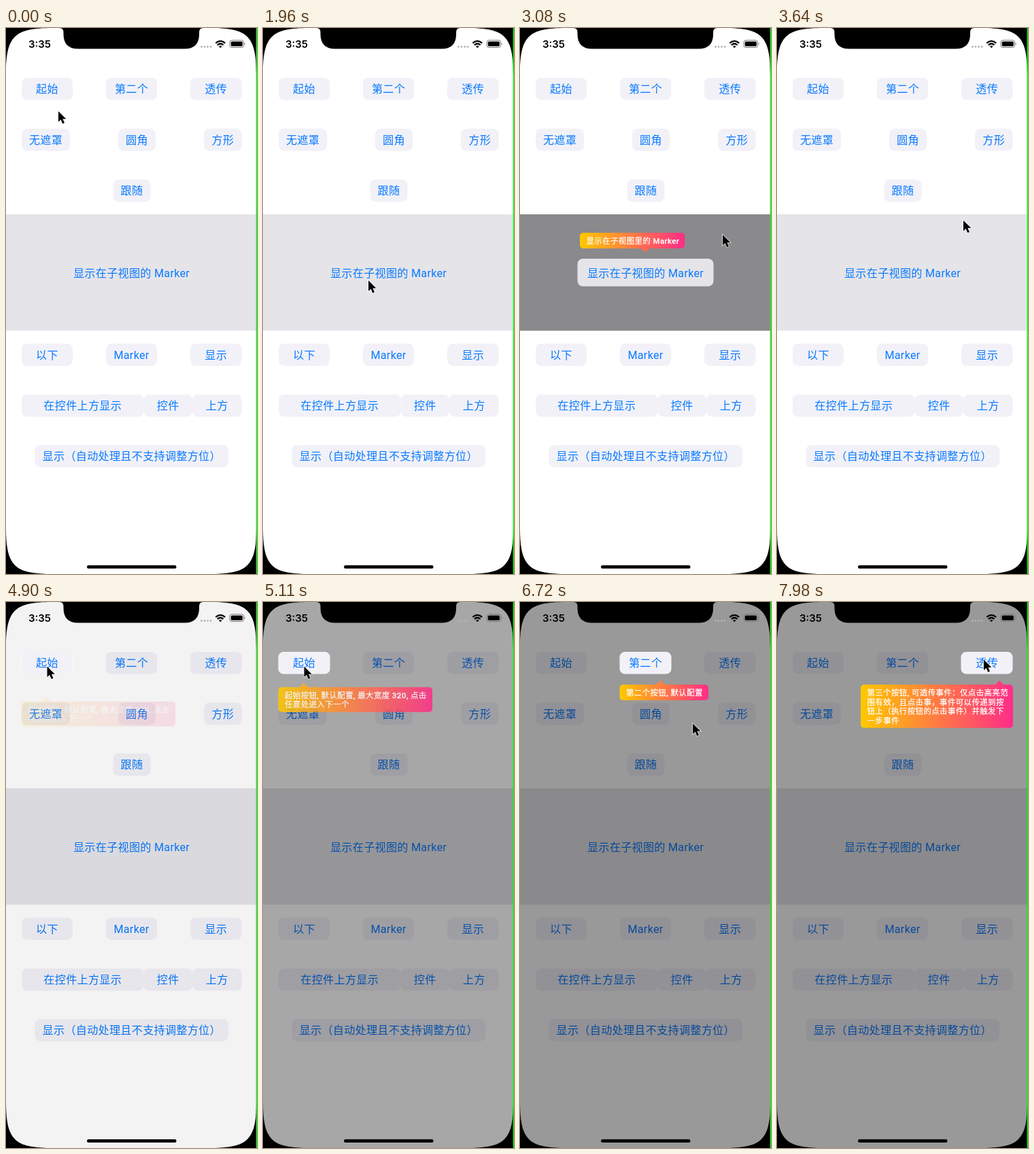
An HTML page that plays this animation: 369 px wide and 800 px high, repeating every 8000 ms.

```html
<!DOCTYPE html>
<html lang="zh-CN">
<head>
<meta charset="utf-8">
<title>Marker</title>
<style>
html, body { margin: 0; width: 100%; height: 100%; overflow: hidden; background: #fff; }
svg { display: block; }
text { font-family: Roboto, "Noto Sans CJK SC", "Noto Sans CJK", sans-serif; }
.label { font-size: 16.1px; letter-spacing: .3px; fill: #087aff; text-anchor: middle; }
.tip { font-size: 11.4px; letter-spacing: .45px; font-weight: 500; fill: #fff; stroke: #fff; stroke-width: .25px; }
.time { font: 600 15px Inter, sans-serif; }
</style>
</head>
<body>
<svg width="369" height="800" viewBox="0 0 369 800">
  <rect width="369" height="800" fill="#fff"/>
  <g id="page"><rect y="273" width="369" height="170.5" fill="#e5e4e9"/></g>
  <path id="subDim" fill-rule="evenodd"/>
  <path id="mainDim" fill-rule="evenodd"/>
  <g id="bubbles"></g>

  <text class="time" x="33" y="29">3:35</text>
  <g fill="#b4b4b8">
    <circle cx="287.5" cy="27.5" r="1.4"/><circle cx="292" cy="27.5" r="1.4"/>
    <circle cx="296.5" cy="27.5" r="1.4"/><circle cx="301" cy="27.5" r="1.4"/>
  </g>
  <g fill="none" stroke="#000" stroke-width="2.3">
    <path d="M308.3 22.2Q315.2 16 322.1 22.2M310.8 25Q315.2 21 319.6 25"/>
    <path d="M315.2 29.3L312.9 27Q315.2 25 317.5 27Z" fill="#000" stroke="none"/>
  </g>
  <rect x="329" y="18" width="20.5" height="10.5" rx="3" fill="none" stroke="#777"/>
  <rect x="330.7" y="19.7" width="17.1" height="7.1" rx="1.6"/>
  <path d="M350.8 21.5q2 1.8 0 3.6z" fill="#777"/>
  <rect x="119" y="787.3" width="131.5" height="4.7" rx="2.3"/>

  <path fill-rule="evenodd" d="M0 0H369V800H0ZM0 68V732C0 788 12 800 68 800H300C356 800 368 788 368 732V68C368 12 356 0 300 0H68C12 0 0 12 0 68Z"/>
  <path d="M78.500 0Q84.500 0 84.500 6V9Q84.500 30.500 106 30.500H262.500Q284 30.500 284 9V6Q284 0 290 0Z"/>
  <rect x="367.6" width="1.4" height="800" fill="#0f0"/>
  <path id="cursor" d="M0 0V15.500L3.600 12.200L6.200 18.200L9 17L6.400 11.200H11.300Z" stroke="#fff" stroke-width="1.3" paint-order="stroke"/>
</svg>
<script>
const LOOP = 8000, STEP = 70, FADE = 380, SLIDE = 28, DIM = 0.4;
const $ = id => document.getElementById(id);

function add(parent, tag, attrs, text = '') {
  const el = document.createElementNS('http://www.w3.org/2000/svg', tag);
  for (const key in attrs) el.setAttribute(key, attrs[key]);
  el.textContent = text;
  parent.append(el);
  return el;
}

// Rows of buttons: top, then [left, right, title]
const rows = [
  [73, [23, 98, '起始'], [147, 222, '第二个'], [271, 346.5, '透传']],
  [147.5, [23, 94, '无遮罩'], [165, 220, '圆角'], [291, 346.5, '方形']],
  [222, [157.5, 212.5, '跟随']],
  [462.5, [23, 98, '以下'], [147, 222, 'Marker'], [271, 346.5, '显示']],
  [537, [23, 202.5, '在控件上方显示'], [202.5, 274, '控件'], [274, 346.5, '上方']],
  [611, [42.5, 327, '显示（自动处理且不支持调整方位）']]
];
const label = (x, y, text) => add($('page'), 'text', { class: 'label', x, y }, text);
for (const [y, ...buttons] of rows)
  for (const [left, right, title] of buttons) {
    add($('page'), 'rect', { x: left, y, width: right - left, height: 32.5, rx: 8, fill: '#f2f1f8' });
    label((left + right) / 2, y + 22.3, title);
  }
label(184.5, 364.5, '显示在子视图的 Marker');

const marks = [
  { from: 2540, to: 3370, hole: [84.5, 338, 200, 40.5], x: 88, y: 300, w: 154, tip: 184, dir: -1,
    lines: ['显示在子视图里的 Marker'] },
  { from: 4818, to: 6300, hole: [22.5, 73, 76, 32.5], x: 22.5, y: 121, w: 226.5, tip: 60, dir: 1,
    lines: ['起始按钮, 默认配置, 最大宽度 320, 点击', '任意处进入下一个'] },
  { from: 6300, to: 7000, hole: [146.5, 73, 76, 32.5], x: 146.5, y: 121, w: 130.5, tip: 206.5, dir: 1,
    lines: ['第二个按钮, 默认配置'] },
  { from: 7000, to: 9000, hole: [270.5, 73, 76, 32.5], x: 123, y: 121, w: 224, tip: 327, dir: 1,
    lines: ['第三个按钮, 可透传事件：仅点击高亮范', '围有效，且点击事，事件可以传递到按',
      '钮上（执行按钮的点击事件）并触发下', '一步事件'] }
];

function roundRect(x, y, w, h, r) {
  const arc = (dx, dy) => `a${r} ${r} 0 0 1 ${dx} ${dy}`;
  return `M${x + r} ${y}h${w - 2 * r}${arc(r, r)}v${h - 2 * r}${arc(-r, r)}` +
    `h${2 * r - w}${arc(-r, -r)}v${2 * r - h}${arc(r, -r)}z`;
}

marks.forEach((m, i) => {
  const h = 23 + 13.5 * (m.lines.length - 1);
  const grad = add($('bubbles'), 'linearGradient',
    { id: 'grad' + i, gradientUnits: 'userSpaceOnUse', x1: m.x, x2: m.x + m.w, y1: 0, y2: 0 });
  add(grad, 'stop', { offset: 0, 'stop-color': '#ffc800' });
  add(grad, 'stop', { offset: 1, 'stop-color': '#ff2d87' });
  m.el = add($('bubbles'), 'g', {});
  const arrow = m.dir > 0
    ? `M${m.tip - 6} ${m.y}l6 -6l6 6z`
    : `M${m.tip + 6} ${m.y + h}l-6 6l-6 -6z`;
  add(m.el, 'path', { d: roundRect(m.x, m.y, m.w, h, 5) + arrow, fill: `url(#grad${i})` });
  m.lines.forEach((line, n) =>
    add(m.el, 'text', { class: 'tip', x: m.x + 9.5, y: m.y + 16 + 13.5 * n }, line));
});

// Pointer stops: time, x, y
const stops = [
  [70, 77, 122], [1820, 155, 370], [2590, 155, 370], [3060, 298, 303], [3380, 298, 303],
  [4700, 60.5, 94.5], [5880, 60.5, 94.5], [6280, 254, 178], [7280, 254, 178], [7840, 304, 84.5]
];

const mix = (a, b, p) => a.map((v, i) => v + (b[i] - v) * p);
function ease(t, start, length = FADE) {
  const p = Math.min(1, Math.max(0, (t - start) / length));
  return p * p * (3 - 2 * p);
}

function pointer(t) {
  let at = stops[0].slice(1);
  for (let i = 1; i < stops.length; i++) {
    const start = stops[i - 1][0];
    at = mix(at, stops[i].slice(1), ease(t, start, stops[i][0] - start));
  }
  return at;
}

function setDim(el, outer, hole, alpha) {
  el.setAttribute('d', outer + roundRect(...hole, 8));
  el.setAttribute('fill-opacity', DIM * alpha);
}

function draw(t) {
  for (const m of marks) {
    const shown = ease(t, m.from);
    m.el.setAttribute('opacity', shown * (1 - ease(t, m.to, 250)));
    m.el.setAttribute('transform', `translate(0 ${m.dir * SLIDE * (1 - shown)})`);
  }
  const [sub, first, second, third] = marks;
  setDim($('subDim'), 'M0 273H369V443.5H0Z', sub.hole, ease(t, sub.from) * (1 - ease(t, sub.to, 250)));
  const hole = mix(mix(first.hole, second.hole, ease(t, second.from)), third.hole, ease(t, third.from));
  setDim($('mainDim'), 'M0 0H369V800H0Z', hole, ease(t, first.from));
  $('cursor').setAttribute('transform', `translate(${pointer(t)})`);
}

const begin = performance.now();
function tick() {
  const t = (performance.now() - begin) % LOOP;
  draw(Math.floor(t / STEP) * STEP);
  requestAnimationFrame(tick);
}
tick();
</script>
</body>
</html>
```
